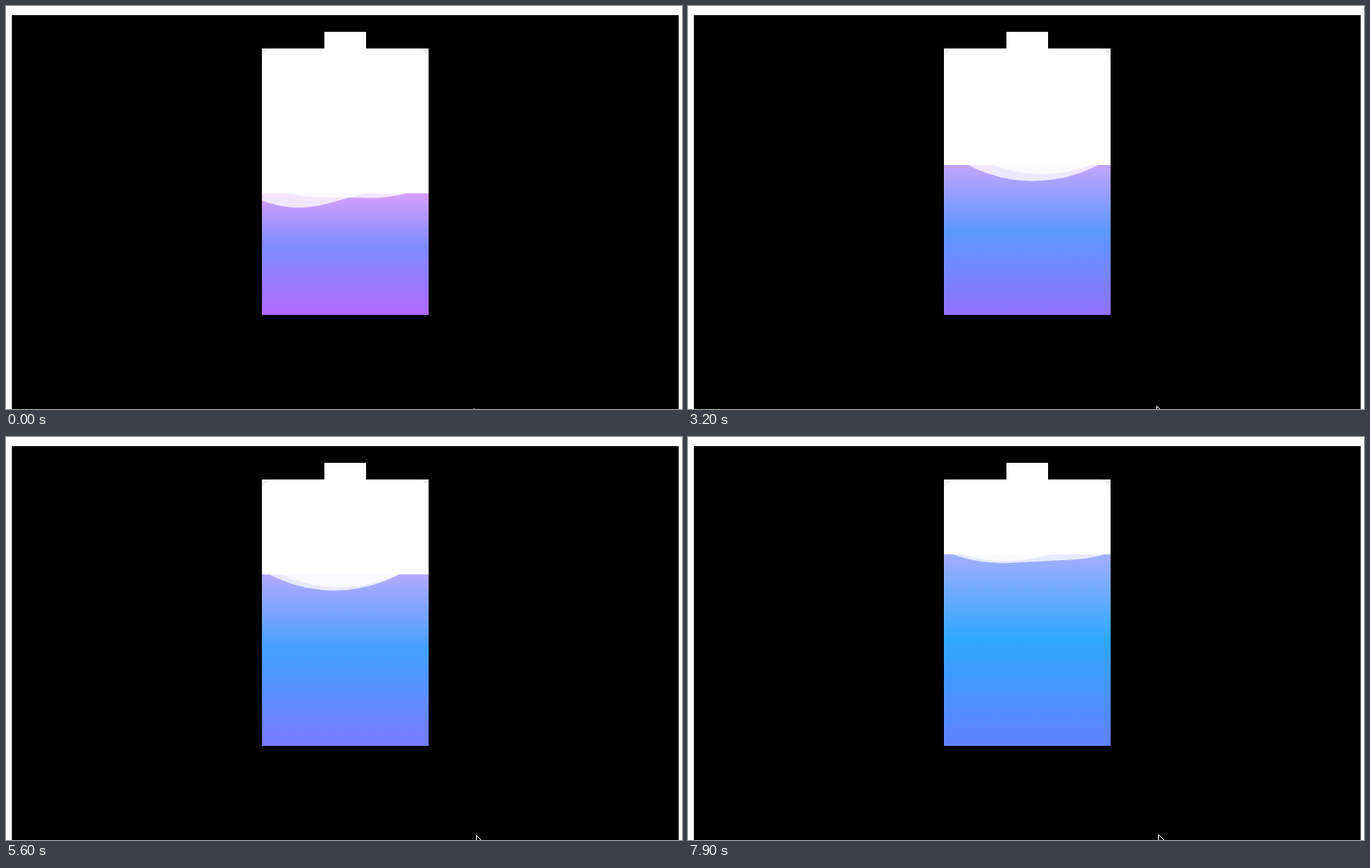
Recreate the animation shown at these times as an HTML page. Size 811x484 px, loop 8000 ms.

```html
<!DOCTYPE html>
<html lang="en">
<head>
<meta charset="utf-8">
<title>Charging battery</title>
<style>
  html, body { margin: 0; width: 100%; height: 100%; overflow: hidden; background: #fff; }
  svg { display: block; width: 811px; height: 484px; }
</style>
</head>
<body>
<svg viewBox="0 0 811 484" xmlns="http://www.w3.org/2000/svg">
  <defs>
    <linearGradient id="liquid" x1="0" y1="0" x2="0" y2="1">
      <stop offset="0" stop-color="#7abcff"/>
      <stop offset=".44" stop-color="#00bcd4"/>
      <stop offset="1" stop-color="#2196f3"/>
    </linearGradient>
    <clipPath id="inside"><rect x="307" y="51" width="200" height="320"/></clipPath>
  </defs>
  <rect width="811" height="484" fill="#fff"/>
  <rect x="7" y="11" width="800" height="473" fill="#000"/>
  <rect x="382" y="31" width="50" height="20" fill="#fff"/>
  <path d="M307 371V66a15 15 0 0 1 15-15H492a15 15 0 0 1 15 15V371Z" fill="#fff"/>
  <rect id="fill" x="307" width="200" fill="url(#liquid)"/>
  <g id="waves" clip-path="url(#inside)" fill="#fff" fill-opacity=".75"></g>
  <path id="cursor" d="M.5 .5V17.5L4.5 13.5L7.5 19.5L9.5 18.5L6.5 12.5H12.5Z"
        fill="#000" stroke="#fff" stroke-linejoin="bevel"/>
</svg>
<script>
const LOOP = 8000, STEP = 100;
const BOTTOM = 371, CENTER_X = 407, HALF = 200;
const $ = id => document.getElementById(id);

// Corner radii run clockwise from top left; y moves in px/s, angle in deg/s.
const waves = [
  { radii: [168, 170, 160, 154], y: 30, rise: 10.15, angle: 181, spin: 10.9 },
  { radii: [166, 121, 160, 160], y: 24, rise: 10.2, angle: 164.6, spin: 12 }
];

// Time in ms, then the pointer tip.
const pointer = [[0, 561, 483], [1900, 561, 481], [2300, 562, 480], [4100, 564, 478], [5900, 564, 477]];

function roundedSquare([tl, tr, br, bl]) {
  const h = HALF, arc = (r, x, y) => `A${r} ${r} 0 0 1 ${x} ${y}`;
  return `M${tl - h} ${-h}H${h - tr}${arc(tr, h, tr - h)}V${h - br}${arc(br, h - br, h)}` +
         `H${bl - h}${arc(bl, -h, h - bl)}V${tl - h}${arc(tl, tl - h, -h)}Z`;
}

for (const wave of waves) {
  wave.path = document.createElementNS('http://www.w3.org/2000/svg', 'path');
  wave.path.setAttribute('d', roundedSquare(wave.radii));
  $('waves').append(wave.path);
}

function draw(ms) {
  const s = ms / 1000;
  const top = 225 - 10.63 * s;
  const charge = (307 - top) / 240;
  const edge = Math.round(top);
  $('fill').setAttribute('y', edge);
  $('fill').setAttribute('height', BOTTOM - edge);
  $('fill').style.filter = `hue-rotate(${90 * (1 - charge)}deg)`;

  for (const { path, y, rise, angle, spin } of waves)
    path.setAttribute('transform', `translate(${CENTER_X} ${y - rise * s}) rotate(${angle + spin * s})`);

  const [, x, y] = pointer.filter(([start]) => start <= ms).pop();
  $('cursor').setAttribute('transform', `translate(${x} ${y})`);
}

const begin = performance.now();
function tick() {
  const elapsed = (performance.now() - begin) % LOOP;
  draw(Math.floor(elapsed / STEP) * STEP);
  requestAnimationFrame(tick);
}
tick();
</script>
</body>
</html>
```
